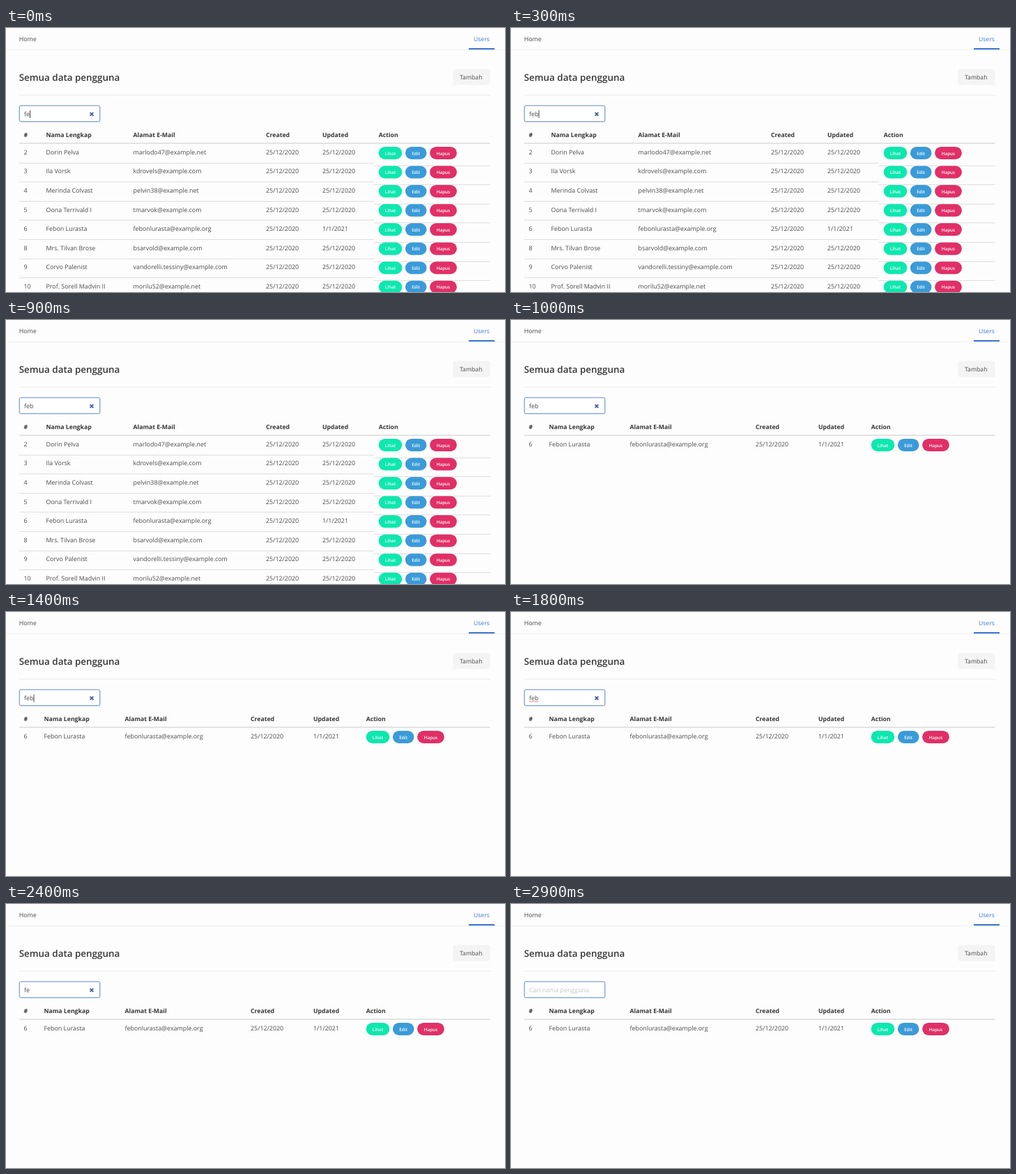
An HTML page that plays this animation: 716 by 380 pixels, repeating every 3000 ms.

```html
<!DOCTYPE html>
<html lang="id">
<head>
<meta charset="utf-8">
<title>Semua data pengguna</title>
<style>
html, body { margin: 0; width: 100%; height: 100%; overflow: hidden; background: #fdfdfd; }
svg { display: block; }
text { font: 8.9px "Open Sans", "Noto Sans", sans-serif; fill: #4a4a4a; text-rendering: geometricPrecision; }
.head { font-size: 8.7px; font-weight: 700; fill: #363636; }
.title { font-size: 13.4px; font-weight: 600; fill: #363636; }
.link { font-size: 8.6px; fill: #3f78d2; }
.add { font-size: 8.7px; }
.pill { font-size: 6.3px; font-weight: 600; fill: #fff; text-anchor: middle; }
.hint { fill: #c6c6c6; }
.line { shape-rendering: crispEdges; }
</style>
</head>
<body>
<svg id="stage" width="716" height="380" viewBox="0 0 716 380"></svg>
<script>
const LOOP = 3000, ROW = 27.55, TOP = 166.2;
const HEADS = ['#', 'Nama Lengkap', 'Alamat E-Mail', 'Created', 'Updated', 'Action'];
const WIDE = [25.5, 57.5, 182.5, 373, 454, 534.7];
const NARROW = [25.5, 54.5, 170.5, 351, 441, 516.7];
const DAY = '25/12/2020';
const USERS = [
  [2, 'Dorin Pelva', 'marlodo47@example.net', DAY, DAY],
  [3, 'Ila Vorsk', 'kdrovels@example.com', DAY, DAY],
  [4, 'Merinda Colvast', 'pelvin38@example.net', DAY, DAY],
  [5, 'Oona Terrivald I', 'tmarvok@example.com', DAY, DAY],
  [6, 'Febon Lurasta', 'febonlurasta@example.org', DAY, '1/1/2021'],
  [8, 'Mrs. Tilvan Brose', 'bsarvold@example.com', DAY, DAY],
  [9, 'Corvo Palenist', 'vandorelli.tessiny@example.com', DAY, DAY],
  [10, 'Prof. Sorell Madvin II', 'morilu52@example.net', DAY, DAY]
];
// label, offset, width, colour
const ACTIONS = [
  ['Lihat', 0, 33.6, '#0de8ae'],
  ['Edit', 38.2, 30.6, '#3a9bd8'],
  ['Hapus', 73.4, 38.8, '#e12f68']
];

const text = (x, y, s, cls = '') => `<text x="${x}" y="${y}" class="${cls}">${s}</text>`;
const rect = (x, y, w, h, fill, r = 0, extra = '') =>
  `<rect x="${x}" y="${y}" width="${w}" height="${h}" rx="${r}" fill="${fill}" ${extra}/>`;
const line = (x, y, w, fill, h = 1) => rect(x, y, w, h, fill, 0, 'class="line"');
const path = (d, color, width) =>
  `<path d="${d}" fill="none" stroke="${color}" stroke-width="${width}"/>`;

function page() {
  return text(18.7, 18.8, 'Home') + text(671, 18.8, 'Users', 'link') +
    line(0, 31, 716, '#efefef') + line(664, 29, 37, '#3b74d0', 2) +
    text(18.7, 76, 'Semua data pengguna', 'title') +
    rect(641.5, 59, 53, 23, '#f4f4f4', 2) + text(651, 74, 'Tambah', 'add') +
    line(19, 96, 675.5, '#ececec');
}

function searchBox({ query, caret, misspelt }) {
  let out = rect(18.5, 111, 117, 24.5, '#c9d9f2', 3) +
    rect(19.3, 111.8, 115.4, 22.9, '#fff', 2, 'stroke="#6c95d6"');
  if (!query) return out + text(26, 127.2, 'Cari nama pengguna', 'hint');
  out += text(26, 127.2, query) + path('M120.6 121.6l4.8 4.8m0-4.8l-4.8 4.8', '#3d5c96', 1.7);
  if (caret) out += rect(query === 'fe' ? 34.1 : 39.6, 118.5, 0.9, 11, '#333');
  if (misspelt) out += path('M26 129.6' + 'l1.1-1.2l1.1 1.2'.repeat(6), '#e0505c', 0.8);
  return out;
}

function table(filtered) {
  const cols = filtered ? NARROW : WIDE;
  const rows = filtered ? USERS.filter(u => u[1].startsWith('Feb')) : USERS;
  let out = HEADS.map((h, i) => text(cols[i], 157.2, h, 'head')).join('') +
    rect(19, 165.3, 675.5, 1.3, '#d6d6d6');
  rows.forEach((user, n) => {
    const y = TOP + n * ROW;
    out += user.map((s, i) => text(cols[i], y + 15.7, s)).join('');
    for (const [label, dx, w, color] of ACTIONS) {
      const x = cols[5] + dx;
      out += rect(x, y + 4.7, w, 18, color, 9) + text(x + w / 2, y + 16.4, label, 'pill');
    }
    if (!filtered) out += line(19, y + 27.6, 509, '#dedede') + line(528, y + 31.6, 166.5, '#dedede');
  });
  return out;
}

function stateAt(t) {
  const query = t < 100 ? 'fe' : t < 1900 ? 'feb' : t < 2600 ? 'fe' : '';
  const lastKey = t < 100 ? 0 : t < 1900 ? 100 : 1900;
  return {
    query,
    caret: Math.floor((t - lastKey) / 500) % 2 === 0,
    misspelt: t >= 1500 && t < 1900,
    filtered: t >= 1000
  };
}

const stage = document.getElementById('stage');
const start = performance.now();
let shown = '';

function draw(now) {
  const state = stateAt(Math.max(0, now - start) % LOOP);
  const key = JSON.stringify(state);
  if (key !== shown) {
    shown = key;
    stage.innerHTML = page() + searchBox(state) + table(state.filtered);
  }
  requestAnimationFrame(draw);
}
draw(start);
</script>
</body>
</html>
```
